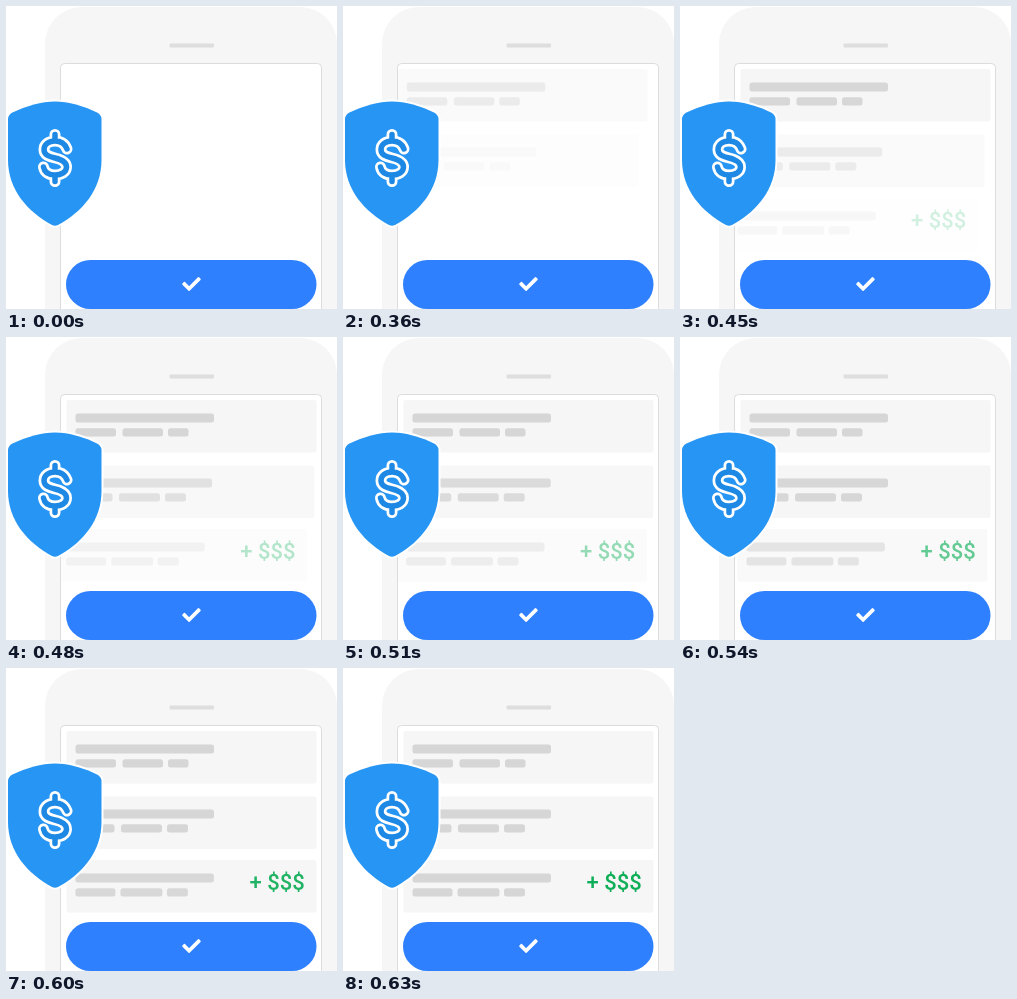
Write an HTML page that moves like this. It is 331x303 px and loops after 1170 ms.

```html
<!DOCTYPE html>
<html lang="en">
<head>
<meta charset="utf-8">
<title>Protected payment</title>
<style>
  html, body { margin: 0; width: 100%; height: 100%; overflow: hidden; background: #fff; }
  svg { display: block; width: 331px; height: 303px; }
  .bar { fill: #d6d6d6; }
  .card { fill: #f6f6f6; }
  .sum { font: 500 22px Roboto, Arial, sans-serif; fill: #0fae58; }
</style>
</head>
<body>
<svg viewBox="0 0 331 303">
  <defs>
    <clipPath id="inside"><rect x="55" y="58" width="260" height="260" rx="3.5"/></clipPath>
    <path id="dollar" d="M61 143C59 137.500 54.500 135 49 135C42.500 135 38 138.500 38 143.500C38 149 43 150.500 49 152C55.500 153.500 60.500 155.500 60.500 161C60.500 166 55.500 169 49 169C43 169 38.500 166.500 37.500 161M49 128.500V135M49 169V175.500"/>
  </defs>
  <rect x="39" y="1" width="292" height="360" rx="37" fill="#f6f6f6"/>
  <rect x="163.500" y="37.500" width="44.500" height="4" rx="1" fill="#dedede"/>
  <rect x="54.500" y="57.500" width="261" height="280" rx="4" fill="#fff" stroke="#dcdcdc"/>
  <g id="cards" clip-path="url(#inside)"></g>
  <rect x="60" y="254" width="250.500" height="49" rx="24.500" fill="#2f80ff"/>
  <path d="M177 278.100L178.450 276.650L183.100 281.300L192.500 271.900L193.950 273.350L183.100 284.200Z"
    fill="#fff" stroke="#fff" stroke-width="1.600" stroke-linejoin="round"/>
  <path d="M49 95.500C62 95.500 78 100 91 106.500Q95.500 109 95.500 113V154C95.500 184 76 206 52 219Q49 220.500 46 219C22 206 2 184 2 154V113Q2 109 6.500 106.500C20 100 36 95.500 49 95.500Z"
    fill="#2795f3" stroke="#fff" stroke-width="4" paint-order="stroke"/>
  <g fill="none" stroke-linecap="round" stroke-linejoin="round">
    <use href="#dollar" stroke="#fff" stroke-width="11"/>
    <use href="#dollar" stroke="#1e88e5" stroke-width="5.500"/>
  </g>
</svg>
<script>
const LOOP = 1170, START = 360, STEP = 30, LAST = 9;

// Entrance curve, one entry per step
const SHIFT = [-17.5, -14.5, -11.5, -8.3, -5.7, -2, -0.3, 0, 0];
const FADE = [0, 0.12, 0.22, 0.36, 0.48, 0.72, 0.86, 0.96, 1.02];

// y: top of card, bar: top of title bar, lead: steps already made at START
const CARDS = [
  { y: 63, bar: 76.5, lead: 4, row: [[69.5, 40.5], [116.5, 40.5], [162, 20.5]] },
  { y: 128.5, bar: 141.5, lead: 1, row: [[69.5, 39], [115, 41], [161, 21]] },
  { y: 192, bar: 205.5, lead: -1.3, row: [[69.5, 40], [114.5, 42], [161, 21]], sum: '+ $$$' }
];

const NS = 'http://www.w3.org/2000/svg';
function add(parent, tag, attrs) {
  const el = document.createElementNS(NS, tag);
  for (const name in attrs) el.setAttribute(name, attrs[name]);
  return parent.appendChild(el);
}

function bar(parent, x, y, width, height) {
  add(parent, 'rect', { class: 'bar', x, y, width, height, rx: 2.5 });
}

for (const c of CARDS) {
  c.el = add(document.getElementById('cards'), 'g', { opacity: 0 });
  add(c.el, 'rect', { class: 'card', x: 60.5, y: c.y, width: 250, height: 52.5, rx: 2 });
  bar(c.el, 69.5, c.bar, 138.5, 9);
  for (const [x, w] of c.row) bar(c.el, x, c.bar + 14.7, w, 8.3);
  if (c.sum) add(c.el, 'text', { class: 'sum', x: 243.5, y: 221.5 }).textContent = c.sum;
}

function sample(table, k) {
  const p = Math.max(0, Math.min(table.length - 1, k));
  const i = Math.min(table.length - 2, Math.floor(p));
  return table[i] + (table[i + 1] - table[i]) * (p - i);
}

function draw(now) {
  const t = now % LOOP;
  const step = Math.min(LAST, Math.floor((t - START) / STEP));
  for (const c of CARDS) {
    const k = c.lead + step;
    c.el.setAttribute('opacity', step < 0 ? 0 : Math.min(1, sample(FADE, k)));
    c.el.setAttribute('transform', `translate(${sample(SHIFT, k)} 0)`);
  }
}

const begin = performance.now();
function frame() {
  draw(performance.now() - begin);
  requestAnimationFrame(frame);
}
frame();
</script>
</body>
</html>
```
